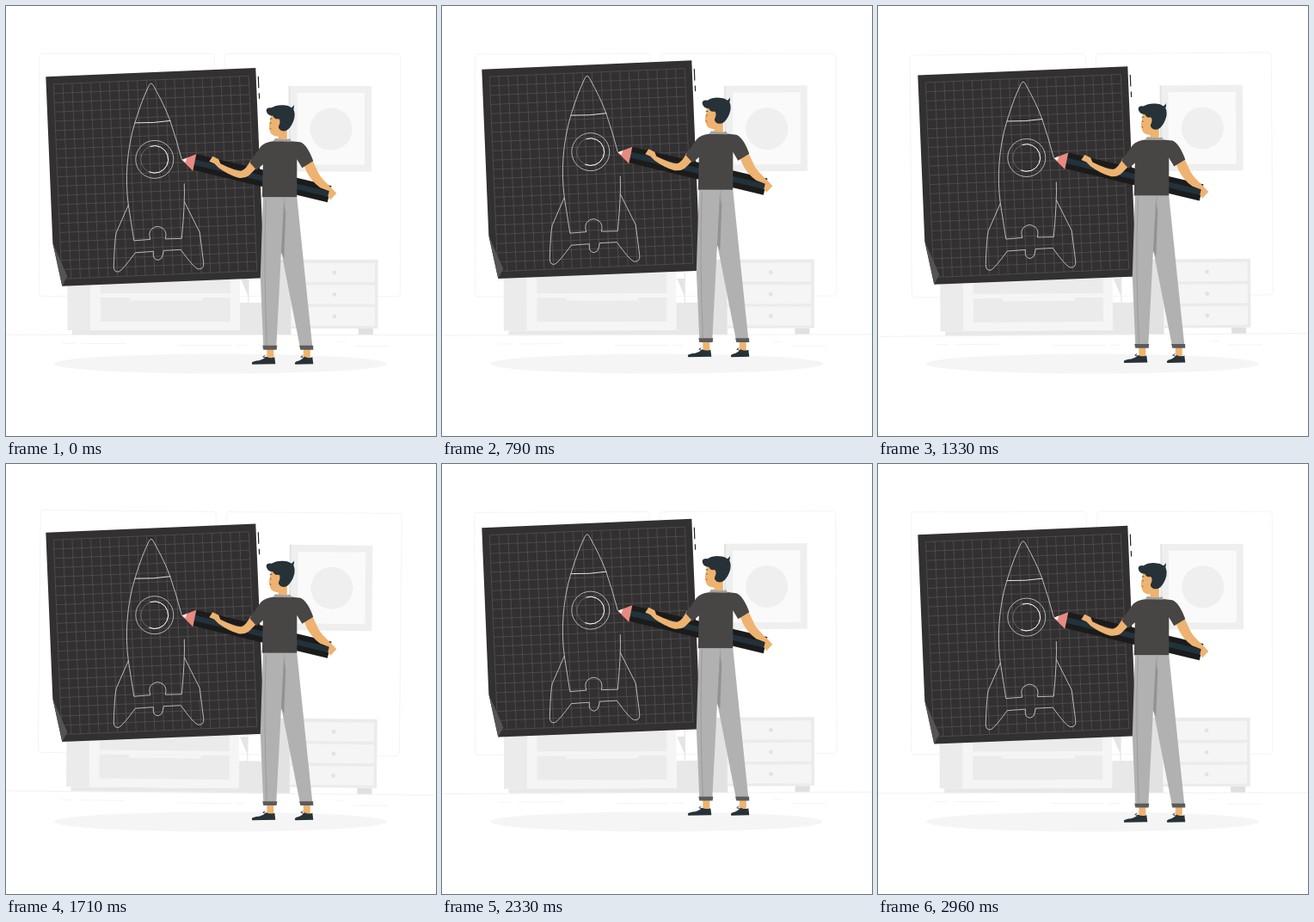
These frames come from a looping animation (500 px wide and 500 px high, 3 s). An HTML page with a canvas:

```html
<!DOCTYPE html>
<html lang="en">
<head>
<meta charset="utf-8">
<title>Rocket sketch</title>
<style>
html, body { margin: 0; width: 100%; height: 100%; overflow: hidden; background: #fff; }
canvas { display: block; width: 500px; height: 500px; }
</style>
</head>
<body>
<canvas id="stage"></canvas>
<script>
const PERIOD = 1500;
const LIFT = 9.5;
const SWAY = Math.PI / 180;
const SKIN = '#eeb370', NAVY = '#263238', SHIRT = '#474645', BLACK = '#1b1b1b';

const canvas = document.getElementById('stage');
const ctx = canvas.getContext('2d');
const ratio = window.devicePixelRatio || 1;
canvas.width = canvas.height = 500 * ratio;

function fill(d, color) {
  ctx.fillStyle = color;
  ctx.fill(new Path2D(d));
}

function line(d, color, width = 1) {
  ctx.strokeStyle = color;
  ctx.lineWidth = width;
  ctx.stroke(new Path2D(d));
}

function box(x1, y1, x2, y2, color) {
  ctx.fillStyle = color;
  ctx.fillRect(x1, y1, x2 - x1, y2 - y1);
}

function disc(x, y, rx, ry, color) {
  ctx.fillStyle = color;
  ctx.beginPath();
  ctx.ellipse(x, y, rx, ry, 0, 0, 7);
  ctx.fill();
}

function arc(x, y, r, from, to, color, width) {
  ctx.strokeStyle = color;
  ctx.lineWidth = width;
  ctx.beginPath();
  ctx.arc(x, y, r, from, to);
  ctx.stroke();
}

const mix = (a, b, k) => a + (b - a) * k;

function drawRoom() {
  for (const x of [38.5, 254.5]) {
    ctx.strokeStyle = '#f2f2f2';
    ctx.lineWidth = 0.8;
    ctx.beginPath();
    ctx.roundRect(x, 55.5, 204, 282, 4);
    ctx.stroke();
  }
  line('M0 382.5H500', '#ebebeb', 0.7);
  line('M65 392.5H80M88 392.5H140M200 394.5H263M269 394.5H280M385 390.5H395M405 395.5H446', '#f0f0f0', 0.7);

  // picture
  box(328.5, 93, 331, 192.5, '#e2e2e2');
  box(330.5, 93, 425, 192.5, '#efefef');
  box(338.5, 101, 417, 184.5, '#fafafa');
  disc(378, 143, 24.5, 24.5, '#efefef');

  // low cabinet
  fill('M273 317H282V338Z', '#e4e4e4');
  line('M282 310V346', '#e6e6e6', 1.2);
  box(272, 345, 305, 382, '#e8e8e8');
  box(77, 377, 305, 382, '#e8e8e8');
  box(71.5, 310, 98.5, 377, '#ebebeb');
  box(98.5, 310, 272, 377, '#f5f5f5');
  box(110, 311, 261, 334, '#ebebeb');
  box(110, 339, 261, 367, '#ebebeb');
  box(144, 339, 228, 342.5, '#f5f5f5');

  // drawers
  box(299, 295, 331.5, 382, '#e2e2e2');
  box(410, 375, 427, 382, '#e0e0e0');
  box(331, 295, 432.5, 375, '#ebebeb');
  for (const y of [299, 324.5, 350]) {
    box(331.5, y, 429, y + 22, '#f5f5f5');
    disc(382, y + 11, 2.4, 2.4, '#e2e2e2');
  }
}

function drawGrid() {
  let d = '';
  for (let i = 0; i <= 21; i++) {
    const k = i / 21;
    d += `M${mix(55, 282, k)} ${mix(90.5, 81, k)}L${mix(64.5, 291.5, k)} ${mix(317, 307.5, k)}`;
    d += `M${mix(55, 64.5, k)} ${mix(90.5, 317, k)}L${mix(282, 291.5, k)} ${mix(81, 307.5, k)}`;
  }
  line(d, '#5d5b5c', 0.6);
}

function drawRocket() {
  const chalk = '#e6e6e6';
  line('M142 231C138 202 140 166 150 134Q158 108 166 92Q168.5 87.5 171 92Q184 115 190.5 133Q198 155 204 178', chalk, 0.75);
  line('M207 206Q208 228 204 270M142 231L148.5 272.5', chalk, 0.75);
  line('M149.5 135.5Q172 136 191 133', chalk, 1);
  line('M148.5 272.5L167.5 271Q165 263 169 259Q176 253 183 259Q187 263 185 270.5L204 270', chalk, 0.75);
  line('M142 231L128 263Q126 270 125 302Q125 310 131 308.5Q135 307 150 286.5L171 285V290Q172 295 177 295Q181.5 294 182 289L183 284L203 283Q218 304 223 305.5Q230 306 229.5 299L225 263L207 227', chalk, 0.75);
  arc(172.5, 178, 22, 0, 7, '#dcdcdc', 0.75);
  arc(172.5, 178, 16, 0, 7, '#858384', 0.6);
  arc(172.5, 178, 15.8, -1.9, 2.0, '#fff', 1);
}

function drawBoard() {
  fill('M46 82L290 71.7L300.2 316L65 325.3L54 275Z', '#323031');
  drawGrid();
  fill('M54 275L71 314L65 325.3Z', '#555354');
  drawRocket();
  line('M293 81.5L293.5 95M294 101L294.3 107.5', '#222', 1.2);
}

function drawPencil() {
  fill('M221 172L378 209L373.5 228L217 190.5Z', BLACK);
  fill('M219.7 178.2L376.5 215.3L375 221.6L218.3 184.5Z', '#22323c');
  fill('M204 178.5L221 172L217 191.5Z', '#e88a80');
  fill('M204 178.5L210 176.3L208.5 181.6Z', '#f3eeee');
}

function drawLegs() {
  for (const x of [303, 345.5]) box(x, 398, x + 8, 410, SKIN);
  fill('M285.5 414.5Q287 412.5 294 412Q300 410 302 407.5Q307 410 312 408L313 416L286 416.5Z', NAVY);
  fill('M335.5 414.5Q337 412.5 341 412Q345 410 347 407.5Q351 410 356 408L357 416L336 416.5Z', NAVY);
  line('M302 409L298.5 407.5L301 406M346 409L342.5 407.5L345 406', NAVY, 0.9);
  fill('M322 222H338L346 300L356 396H341.5L319.5 284Z', '#b1b1b1');
  fill('M322 222L325 240L323 293L319 285Z', '#929292');
  fill('M298.5 222H323L320.5 270L314 396H299L295.5 315Z', '#b1b1b1');
  line('M302 224Q299 300 303 394', '#969696', 0.8);
  line('M324 223L322 250', '#9b9b9b', 0.7);
  fill('M298 394.5H315L314.3 399.3H299Z', '#5b5b5b');
  fill('M340.8 394.5H356.8L357 399.3H342Z', '#5b5b5b');
}

function drawHead() {
  fill('M317 140H326.5V156Q319 158 316 154Z', SKIN);
  fill('M308 123L307 132L305.5 138.5L306.5 145Q308 150 313 151Q318 152 321 149L325 143L324 124Z', SKIN);
  fill('M302.3 121Q303 117 308.5 118Q314 114.5 322 115Q328 115 331.5 118Q334 116.5 334 114.5Q335.5 117 334 120Q336 124 335 130Q333 138 328 143Q324 146.5 319.5 144.5Q315.5 142 317 138.5Q319.5 134 317 131Q312 132 310 127.5Q303 127 302.3 121Z', NAVY);
  fill('M312 134Q315 129.5 317.5 132Q318.5 137 316 140Q313 138 312 134Z', SKIN);
  line('M306.5 131L309 130.5M307.5 135V136.5', NAVY, 0.8);
  line('M306.3 141.5L308 143', '#d85552', 1.2);
}

function drawBody() {
  drawLegs();
  fill('M346 184L356 179L363 194Q366 200 377 210L384 217.5L377 225L374 221L375.5 215L365 211Q355 204 349 192Z', SKIN);
  line('M375.5 209L378 209.5', NAVY, 1);
  fill('M284 179Q279 190 273 191.5Q266 191.5 249 183L247 178L240 174.5L236 180.5L242 183L247 188Q259 196.5 270 199.5Q277 200.5 282 197L293 186Z', SKIN);
  fill('M310 157Q301 158 296 163L283 181.5L291 190.5L298.5 184L297.5 222H338V178L344 188L357 180Q350 161 342 158Q326 156 310 157Z', SHIRT);
  drawHead();
  fill('M310 157L313 153.5Q322 156 330 154L332 157.5Z', '#a0a0a0');
}

function render(now) {
  const phase = ((now + 10) % PERIOD) / PERIOD;
  const lift = LIFT * (1 - Math.abs(1 - 2 * phase));
  // linear swing: 0, +1, 0, -1, 0
  const swing = phase < 0.25 ? 4 * phase : phase < 0.75 ? 2 - 4 * phase : 4 * phase - 4;

  ctx.setTransform(ratio, 0, 0, ratio, 0, 0);
  ctx.fillStyle = '#fff';
  ctx.fillRect(0, 0, 500, 500);

  ctx.save();
  ctx.translate(250, 225);
  ctx.rotate(swing * SWAY);
  ctx.translate(-250, -225);
  drawRoom();
  ctx.restore();

  disc(249.5, 416, 193.5, 11.5, '#f5f5f5');

  ctx.translate(0.3, 0.5 - lift);
  drawBoard();
  drawPencil();
  drawBody();
}

ctx.lineJoin = 'round';
const start = performance.now();
function tick() {
  render(performance.now() - start);
  requestAnimationFrame(tick);
}
tick();
</script>
</body>
</html>
```
